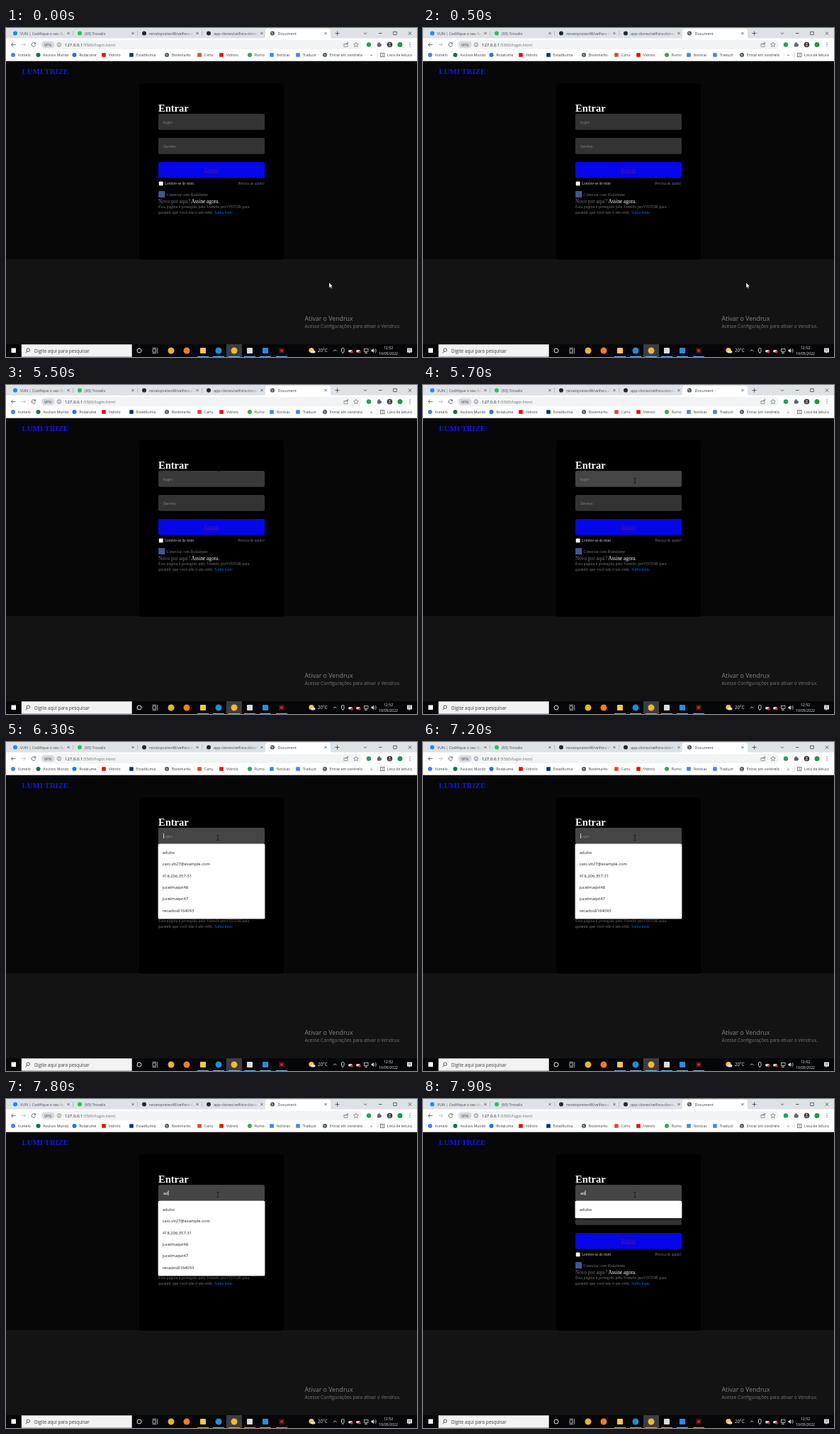
An HTML page for the animation above (8000 ms loop, 580 by 464 pixels).

```html
<!DOCTYPE html>
<html lang="pt-BR">
<head>
<meta charset="utf-8">
<title>Document</title>
<style>
html, body { margin: 0; width: 100%; height: 100%; overflow: hidden; background: #070707; }
svg { display: block; width: 100vw; height: 100vh; }
text { white-space: pre; }
.ui { font-family: "Open Sans", "Noto Sans", sans-serif; }
.serif { font-family: "Liberation Serif", serif; }
.field { font-family: "Liberation Sans", sans-serif; }
</style>
</head>
<body>
<svg id="stage" viewBox="0 0 580 464" xmlns="http://www.w3.org/2000/svg">
  <defs>
    <linearGradient id="fade"><stop offset="0" stop-color="#dee1e6" stop-opacity="0"/><stop offset="1" stop-color="#dee1e6"/></linearGradient>
  </defs>
</svg>
<script>
const svg = document.getElementById('stage');
const LOOP = 8000;

const rect = (x, y, w, h, fill, rx = 0, more = '') =>
  `<rect x="${x}" y="${y}" width="${w}" height="${h}" rx="${rx}" fill="${fill}" ${more}/>`;
const dot = (x, y, r, fill) => `<circle cx="${x}" cy="${y}" r="${r}" fill="${fill}"/>`;
const ring = (x, y, r, color, w = .8) =>
  `<circle cx="${x}" cy="${y}" r="${r}" fill="none" stroke="${color}" stroke-width="${w}"/>`;
const line = (d, color, w = .8) => `<path d="${d}" fill="none" stroke="${color}" stroke-width="${w}"/>`;
const text = (x, y, size, fill, str, cls = 'ui', more = '') =>
  `<text x="${x}" y="${y}" font-size="${size}" fill="${fill}" class="${cls}" ${more}>${str}</text>`;
const cross = (x, y, r, color) =>
  line(`M${x - r} ${y - r}l${2 * r} ${2 * r}m0 ${-2 * r}l${-2 * r} ${2 * r}`, color, .7);
const globe = (x, y) => dot(x, y, 3, '#4a4f58') + line(`M${x - 2} ${y - .8}h2.2l1 1.4M${x - 1} ${y + 1.4}h1.6`, '#fff', .7);

function tabs() {
  const list = [
    [13, '#1a8cff', 'VUN | Codifique o seu futuro'],
    [104, '#25c35f', '(93) Trovalix'],
    [195, '#24292f', 'renatoprates48/velfora-clone'],
    [286, '#24292f', 'app-clones/velfora-clone: p'],
  ];
  let out = rect(0, 0, 580, 15, '#dee1e6');
  list.forEach(([x, color, title], i) => {
    const end = x + 71;
    out += dot(x, 7.5, 3, color) + text(x + 7, 9.6, 5.3, '#45494d', title);
    out += rect(end - 12, 2, 12, 11, 'url(#fade)') + rect(end, 2, 14, 11, '#dee1e6');
    out += cross(x + 75, 7.5, 1.6, '#3c4043');
    if (i < 3) out += rect(x + 81.5, 4, .6, 7, '#9a9da1');
  });
  out += '<path d="M363 15q3 0 3-3V4q0-3 3-3h86q3 0 3 3v8q0 3 3 3z" fill="#fff"/>';
  out += globe(376, 7.5) + text(383.5, 9.6, 5.4, '#3c4043', 'Document') + cross(451, 7.5, 1.6, '#3c4043');
  out += line('M464.5 7.5h6m-3 -3v6', '#3c4043');
  out += line('M505 6.5l2 2l2 -2M526 7.5h4.5', '#333');
  return out + rect(546.8, 5.2, 4.4, 4.4, 'none', 0, 'stroke="#333" stroke-width=".7"') + cross(570, 7.5, 2.2, '#333');
}

function toolbar() {
  const gray = '#5f6368';
  return rect(0, 14.5, 580, 32.2, '#fff')
    + line('M13.5 23.5h-6m2.6 -2.7l-2.7 2.7l2.7 2.7', '#4a4d51')
    + line('M21.5 23.5h6m-2.6 -2.7l2.7 2.7l-2.7 2.7', '#b9bbbe')
    + line('M41.2 21.7a2.8 2.8 0 1 0 .5 2.6M41.8 20.2v2.2h-2.2', '#4a4d51')
    + rect(48, 17, 454, 13, '#f1f3f4', 6.5)
    + rect(50.5, 19, 18, 9, '#d5d8dc', 4.5) + text(54, 25.5, 5.2, '#45494d', 'VPN')
    + ring(75, 23.5, 2.7, gray, .7) + line('M75 22.9v2.2M75 21.6v.7', gray, .7)
    + text(83, 25.7, 6, '#202124', '127.0.0.1<tspan fill="#6c7075">:5500/login.html</tspan>')
    + rect(477, 22.3, 5, 4, 'none', 0, `stroke="${gray}" stroke-width=".6"`) + line('M479 24q.5 -3 4 -3m-1.3 -1.4l1.4 1.4l-1.4 1.4', gray, .6)
    + '<path d="M494 20.2l1 2.2l2.4 .2l-1.8 1.6l.6 2.4l-2.2 -1.3l-2.2 1.3l.6 -2.4l-1.8 -1.6l2.4 -.2z" fill="none" stroke="#5f6368" stroke-width=".6"/>'
    + dot(512, 23.5, 3.2, '#1da462')
    + rect(524, 21.5, 5, 5, gray, 1) + dot(526.5, 21, 1.1, gray) + dot(529.2, 24, 1.1, gray)
    + dot(541.5, 23.5, 3.8, '#30343a') + dot(541.5, 22.3, 1.3, '#c9a58c') + rect(539.4, 24, 4.2, 2.3, '#7b8794', 1)
    + dot(556, 23.5, 3.5, '#189a4c')
    + [20.9, 23.5, 26.1].map(y => dot(570, y, .7, gray)).join('');
}

function bookmarks() {
  const list = [
    [10, 'Vumelo', '#4285f4'], [45.5, 'Avulsos Mundo', '#0b7a3e'], [96.5, 'Rodalume', '#1877f2'],
    [138, 'Vidrolo', '#f00', 1], [177, 'Estadilumia', '#003580', 1], [227, 'Bookmarks', ''],
    [273, 'Cartu', '#ea4335', 1], [304, 'Vidrolo', '#f00', 1], [344, 'Rumo', '#34a853'],
    [375, 'Notícias', '#4285f4', 1], [412, 'Traduzir', '#4285f4', 1], [450, 'Entrar em vondrelis', ''],
  ];
  const y = 38;
  return list.map(([x, name, color, square]) =>
    (!color ? globe(x, y) : square ? rect(x - 2.8, y - 2.8, 5.6, 5.6, color, .6) : dot(x, y, 3, color))
    + text(x + 6.7, 40, 5.1, '#3c4043', name)).join('')
    + text(514, 40, 6, '#3c4043', '»') + rect(523.7, 34, .6, 8, '#c4c7ca')
    + rect(528.5, 35.4, 5.5, 5.2, 'none', 0, 'stroke="#5f6368" stroke-width=".8"') + line('M530 37.2h2.6m-2.6 1.6h2.6', '#5f6368', .6)
    + text(538, 40, 5.1, '#3c4043', 'Lista de leitura');
}

function page() {
  return rect(0, 46, 580, 280, '#070707') + rect(0, 326, 580, 120, '#131313')
    + text(22.5, 65.3, 10.85, '#1515e6', 'LUMI TRIZE', 'serif', 'font-weight="700"')
    + rect(188, 78, 204, 248.7, '#000', 4)
    + text(215, 117.6, 14.5, '#fff', 'Entrar', 'serif', 'font-weight="700"')
    + rect(215, 121, 150, 22.7, '#333', 2.3, 'id="login"')
    + text(222, 134.6, 6.04, '#7d7d7d', 'login', 'field', 'id="hint"')
    + text(222, 134.6, 6.04, '#fff', '', 'field', 'id="typed"')
    + rect(222, 129, .7, 7, '#fff', 0, 'id="caret"')
    + rect(215, 155, 150, 22.7, '#333', 2.3) + text(222, 168.6, 6.04, '#7d7d7d', 'Senha', 'field')
    + rect(215, 189, 150, 22.5, '#0606ea', 2)
    + text(290, 202.6, 8.2, '#4b1a9c', 'Entrar', 'serif', 'text-anchor="middle" text-decoration="underline"')
    + rect(215.8, 216.4, 5.8, 5.8, '#fff', 1)
    + text(224, 221, 5.44, '#c4c4c4', 'Lembre-se de mim', 'serif')
    + text(365, 221, 5.44, '#757575', 'Precisa de ajuda?', 'serif', 'text-anchor="end"')
    + rect(215.2, 230, 9, 9, '#3b5998')
    + text(226.5, 236.9, 5.89, '#757575', 'Conectar com Rodalume', 'serif')
    + text(215, 247.4, 7.25, '#757575', 'Novo por aqui? <tspan fill="#fff">Assine agora.</tspan>', 'serif')
    + text(215, 254.4, 5.89, '#757575', 'Esta página é protegida pelo Vumelo proVISTOR para', 'serif')
    + text(215, 261.6, 5.89, '#757575', 'garantir que você não é um robô. <tspan fill="#0868e0">Saiba mais</tspan>', 'serif')
    + text(421.5, 413.3, 8.8, '#858585', 'Ativar o Vendrux')
    + text(421.5, 422.6, 6.55, '#777', 'Acesse Configurações para ativar o Vendrux.');
}

function dropdown() {
  const names = ['adubo', 'caio.vlt27@example.com', '418.206.357-31', 'jucelmaqvt48', 'jucelmaqvt47', 'recados8164093'];
  return '<g id="menu">'
    + rect(214, 144.5, 152, 107, '#000', 2, 'id="shade" opacity=".3"')
    + rect(214.6, 143.6, 150.8, 105.8, '#fff', 1.5, 'id="sheet"')
    + names.map((n, i) => text(220.8, 158.1 + i * 16.3, 5.8, '#202124', n, 'ui', 'data-row')).join('') + '</g>';
}

function taskbar() {
  const w = '#e8e8e8';
  const apps = [[233, '#e8b52a'], [255, '#f57c1f'], [278, '#f6c945', 1], [300, '#1b8fd6'],
    [322, '#f5b82e'], [344, '#dcdcdc', 1], [366, '#2a8be0', 1], [389, '#3a1518', 1]];
  return rect(0, 446, 580, 18, '#050608')
    + rect(7.5, 451.5, 6.5, 6.5, '#fff')
    + rect(22, 446.3, 155.6, 17.4, '#f2f2f2', 0, 'stroke="#c4c4c4" stroke-width=".5"')
    + ring(31.3, 454.2, 2.2, '#333', .8) + line('M29.8 456l-2.2 2.2', '#333', .9)
    + text(40, 457.5, 6.4, '#3f3f3f', 'Digite aqui para pesquisar')
    + ring(188, 455, 3, w, 1)
    + rect(207, 453, 4.6, 4, 'none', 0, `stroke="${w}" stroke-width=".7"`) + line('M206.5 451.3h5.6M206.5 458.7h5.6M213.7 451v8', w, .7)
    + rect(311, 446, 22, 18, '#3b3d40')
    + apps.map(([x, c, sq]) => (sq ? rect(x - 4, 451, 8, 8, c, .8) : dot(x, 455, 4.5, c))
      + (x > 270 ? rect(x - 8, 463, 16, 1, '#76b9ed') : '')).join('')
    + dot(389, 455, 2, '#e0202c')
    + dot(431, 454.5, 3.6, '#f8c73c') + rect(430, 455, 6.5, 3.4, '#dfe4ea', 1.7)
    + text(440, 457.4, 6.2, w, '20°C')
    + line('M462 456l2.2 -2.2l2.2 2.2', w)
    + rect(473.5, 451.5, 3.6, 6, 'none', 1.4, `stroke="${w}" stroke-width=".8"`) + line('M475.3 457.5v1.8', w)
    + rect(483, 454, 6, 3.4, '#d8d8d8', 1.7) + dot(488, 457, 1.7, '#e32636')
    + rect(494, 454, 6, 3.4, '#d8d8d8', 1.7) + dot(499, 457, 1.7, '#e32636')
    + rect(505.5, 452.5, 5.5, 4, 'none', 0, `stroke="${w}" stroke-width=".7"`) + line('M508 456.5v2m-2 0h4', w, .7)
    + '<path d="M515.5 453.8h1.4l2 -1.8v6l-2 -1.8h-1.4z" fill="#e8e8e8"/>' + line('M520 453.3q1.3 1.7 0 3.4M521.4 452q2.2 3 0 6', w, .6)
    + text(539.5, 452.7, 5.2, w, '12:52', 'ui', 'text-anchor="middle"')
    + text(539.5, 460.5, 5.1, w, '10/05/2022', 'ui', 'text-anchor="middle"')
    + `<path d="M566 451.5h7v6h-2.7l-1.6 1.8v-1.8h-2.7z" fill="${w}"/>` + line('M567.3 453.4h4.4m-4.4 1.8h4.4', '#222', .5);
}

const pointers = `<path id="arrow" d="M0 0V7.4L1.7 5.9L2.8 8.4L4 7.9L2.9 5.4H5.1Z" fill="#fff" stroke="#000" stroke-width=".35"/>
  <path id="beam" d="M-1.7 -3.6H-.4L0 -3.2L.4 -3.6H1.7M0 -3.2V3.2M-1.7 3.6H-.4L0 3.2L.4 3.6H1.7" fill="none" stroke="#161616" stroke-width=".8"/>`;

svg.insertAdjacentHTML('beforeend', page() + tabs() + toolbar() + bookmarks() + dropdown() + taskbar() + pointers);

const $ = id => document.getElementById(id);
const el = Object.fromEntries(['login', 'hint', 'typed', 'caret', 'menu', 'shade', 'sheet', 'arrow', 'beam'].map(id => [id, $(id)]));
const rows = [...svg.querySelectorAll('[data-row]')];
const show = (node, on) => node.setAttribute('visibility', on ? 'inherit' : 'hidden');

// [start, value...] steps; the last one reached wins
const at = (steps, t) => steps.filter(s => s[0] <= t).pop();
const moves = [[0, 456, 359], [5100, 351, 244], [5300, 305, 173], [5500, 301, 118], [5600, 299, 131], [5700, 299, 135]];
const typing = [[0, ''], [7600, 'a'], [7800, 'ad']];
const hover = [[0, '#333'], [5500, '#393939'], [5600, '#404040'], [5700, '#454545']];
const advance = 6.04 * .556;

function draw(t) {
  const [, x, y] = at(moves, t);
  const inField = t >= 5500;
  show(el.arrow, !inField);
  show(el.beam, inField);
  (inField ? el.beam : el.arrow).setAttribute('transform', `translate(${x} ${y})`);
  el.login.setAttribute('fill', at(hover, t)[1]);

  const word = at(typing, t)[1];
  el.typed.textContent = word;
  show(el.hint, !word);
  el.caret.setAttribute('x', 222 + word.length * advance);
  show(el.caret, t >= 6300 && !(t >= 6700 && t < 7200));

  const count = t >= 7900 ? 1 : rows.length;
  const height = count === 1 ? 24.4 : 105.8;
  show(el.menu, t >= 6300);
  el.sheet.setAttribute('height', height);
  el.shade.setAttribute('height', height + 2);
  rows.forEach((row, i) => show(row, t >= 6300 && i < count));
}

const start = performance.now();
function tick() {
  draw((performance.now() - start) % LOOP);
  requestAnimationFrame(tick);
}
draw(0);
requestAnimationFrame(tick);
</script>
</body>
</html>
```
